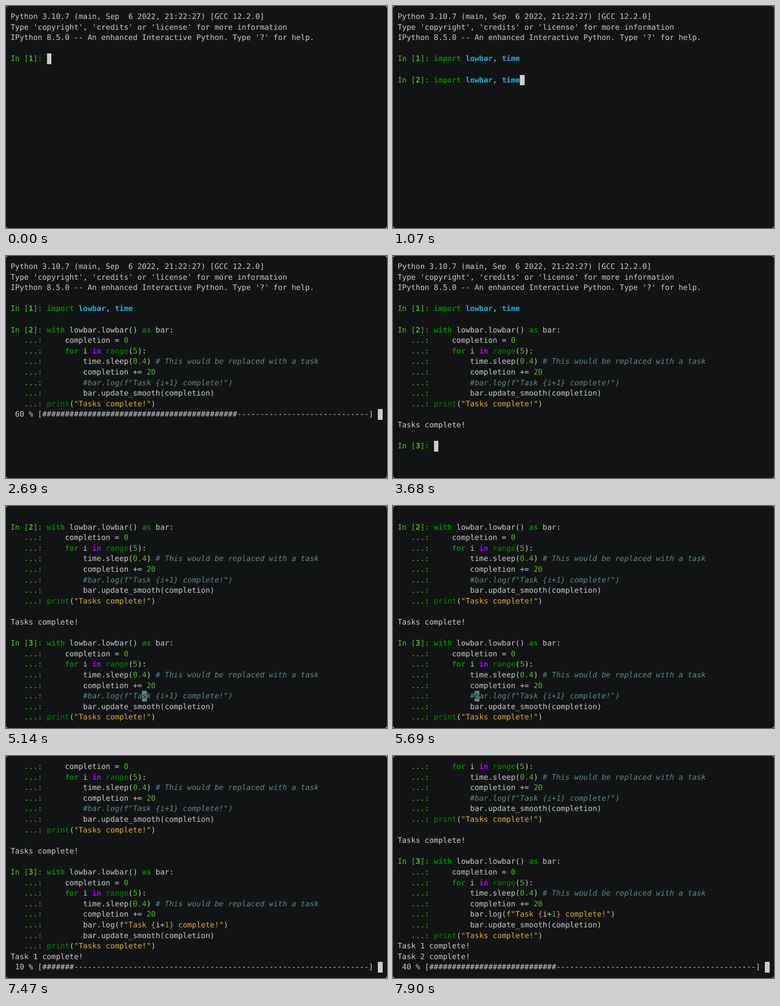
An HTML page that plays this animation: 706x412 px, repeating every 8 s.

```html
<!DOCTYPE html>
<html lang="en">
<head>
<meta charset="utf-8">
<title>Terminal session</title>
<style>
html, body { margin: 0; width: 100%; height: 100%; overflow: hidden; background: #fff; }
#term {
  position: relative; width: 706px; height: 412px; overflow: hidden;
  background: #121314; color: #ccc; border-radius: 4px;
  font: 13.96px/20px "DejaVu Sans Mono", "Noto Sans Mono", monospace;
  font-variant-ligatures: none; text-rendering: geometricPrecision;
}
.row, .cell, .cell span { position: absolute; white-space: pre; }
.cell { overflow: hidden; }
.green { color: #4ebf22; }
.key { color: #008700; font-weight: bold; }
.fn { color: #008700; }
.mod { color: #26b0d7; font-weight: bold; }
.op { color: #af00ff; font-weight: bold; }
.str { color: #ddaf3c; }
.brace { color: #af5f87; font-weight: bold; }
.note { color: #5f8787; font-style: italic; }
.hint { color: #626262; }
</style>
</head>
<body>
<div id="term"></div>
<script>
const LOOP = 8000, COL = 8.405, ROW = 19.605, TOP = 9.9;
const FG = '#ccc', BG = '#121314', NOTE = '#5f8787', STR = '#ddaf3c', HINT = '#626262', MATCH = '#afd7d7';

const colX = c => (c + 1) * COL;
const rowY = r => Math.round(TOP + r * ROW);
// Baselines are rounded up to whole pixels
const textY = r => Math.ceil(TOP + r * ROW + 14.5) - 15;

// Text helpers
const tag = (cls, text) => `<span class="${cls}">${text}</span>`;
const num = n => tag('green', n);
const prompt = n => tag('green', `In [<b>${n}</b>]: `);
const dots = code => tag('green', '   ...: ') + code;
const importLine = `${tag('key', 'import')} ${tag('mod', 'lowbar')}, ${tag('mod', 'time')}`;
const logNote = tag('note', '#bar.log(f"Task {i+1} complete!")');
const logCall = 'bar.log(' + tag('str', 'f"Task ') + tag('brace', '{') + 'i+' + num(1) +
  tag('brace', '}') + tag('str', ' complete!"') + ')';

const block = (n, log) => [
  prompt(n) + `${tag('key', 'with')} lowbar.lowbar() ${tag('key', 'as')} bar:`,
  dots(`    completion = ${num(0)}`),
  dots(`    ${tag('key', 'for')} i ${tag('op', 'in')} ${tag('fn', 'range')}(${num(5)}):`),
  dots(`        time.sleep(${num(0.4)}) ${tag('note', '# This would be replaced with a task')}`),
  dots(`        completion += ${num(20)}`),
  dots(`        ${log}`),
  dots('        bar.update_smooth(completion)'),
  dots(`${tag('fn', 'print')}(${tag('str', '"Tasks complete!"')})`)
];

const bar = p => {
  const n = Math.floor(p * 72 / 100);
  return `${String(p).padStart(3)} % [${'#'.repeat(n)}${'-'.repeat(72 - n)}]`;
};

// A filled character cell, used for the cursor and bracket highlights
const cell = (r, c, ch = ' ', bg = FG, fg = BG, italic = false) => ({ r, c, ch, bg, fg, italic });
const endOfPrint = r => [cell(r, 13, '(', MATCH, '#000'), cell(r, 31, ')', MATCH, '#000'), cell(r, 32)];

const steps = [];
const at = (time, lines, cells, scroll = 0) => steps.push({ time, lines, cells, scroll });

const intro = [
  'Python 3.10.7 (main, Sep  6 2022, 21:22:27) [GCC 12.2.0]',
  "Type 'copyright', 'credits' or 'license' for more information",
  "IPython 8.5.0 -- An enhanced Interactive Python. Type '?' for help.",
  ''
];
const first = [...intro, prompt(1) + importLine, ''];
const second = [...first, ...block(2, logNote)];
const done = [...second, '', 'Tasks complete!', ''];

// First prompt, completed from a suggestion
at(0, [...intro, prompt(1)], [cell(4, 8)]);
at(170, [...intro, prompt(1) + 'i' + tag('hint', 'mport lowbar, time')], [cell(4, 9, 'm', HINT)]);
at(280, [...intro, prompt(1) + 'im' + tag('hint', 'port lowbar, time')], [cell(4, 10, 'p', HINT)]);
at(580, first, [cell(4, 27)]);

// Second prompt, recalled from history
at(780, [...first, prompt(2)], [cell(6, 8)]);
at(1070, [...first, prompt(2) + importLine], [cell(6, 27)]);
at(1220, second, endOfPrint(13));

// Progress bar
[[1460, 0], [1860, 10], [1890, 20], [2260, 30], [2290, 40], [2660, 50], [2690, 60],
 [3060, 70], [3100, 80], [3460, 90], [3490, 100]]
  .forEach(([time, p]) => at(time, [...second, bar(p)], [cell(14, 81)]));
at(3530, second, [cell(14, 0)]);
at(3570, second, [cell(15, 0)]);
at(3610, done, [cell(16, 0)]);
at(3640, done, [cell(17, 0)]);
at(3680, [...done, prompt(3)], [cell(17, 8)]);

// Third prompt: recall the block and walk the cursor to the comment sign
const noted = [...done, ...block(3, logNote)];
const called = [...done, ...block(3, logCall)];
const comment = '#bar.log(f"Task {i+1} complete!")';
const onNote = c => cell(17, c, comment[c - 16], NOTE, BG, true);
at(4000, noted, endOfPrint(19), 5);
at(4190, noted, [cell(18, 32, 'h')], 5);
at(4420, noted, [cell(17, 32, '{', '#ff8787', '#870000', true), cell(17, 36, '}', MATCH, '#000', true)], 5);
at(4640, noted, [onNote(31)], 5);
for (let i = 0; i < 7; i++) at(5140 + i * 60, noted, [onNote(Math.max(18, 29 - 2 * i))], 5);
at(5690, noted, [onNote(17)], 5);
at(5980, called, [cell(17, 16, 'b')], 5);
at(6220, called, [cell(18, 16, 'b')], 5);
at(6360, called, [cell(19, 16, 'a', STR)], 5);
at(6820, called, endOfPrint(19), 5);

// Second run, with a log line per task
[[7070, 0, 0], [7470, 1, 10], [7500, 1, 20], [7870, 2, 30], [7900, 2, 40]].forEach(([time, tasks, p]) => {
  const log = Array.from({ length: tasks }, (_, i) => `Task ${i + 1} complete!`);
  at(time, [...called, ...log, bar(p)], [cell(19, 81)], 6 + tasks);
});

const term = document.getElementById('term');

function drawCell({ r, c, ch, bg, fg, italic }) {
  const x = Math.round(colX(c)), y = rowY(r);
  const w = Math.round(colX(c + 1)) - x, h = rowY(r + 1) - y;
  return `<div class="cell" style="left:${x}px;top:${y}px;width:${w}px;height:${h}px;background:${bg};color:${fg}">` +
    `<span style="left:${colX(c) - x}px;top:${textY(r) - y}px;font-style:${italic ? 'italic' : 'normal'}">${ch}</span></div>`;
}

function draw({ lines, cells, scroll }) {
  term.innerHTML = lines.slice(scroll).map((line, r) =>
    `<div class="row" style="left:${colX(0)}px;top:${textY(r)}px">${line}</div>`).join('') +
    cells.map(drawCell).join('');
}

let shown;
function tick() {
  const t = performance.now() % LOOP;
  const step = steps.filter(s => s.time <= t).pop();
  if (step !== shown) draw(shown = step);
  requestAnimationFrame(tick);
}
tick();
</script>
</body>
</html>
```
